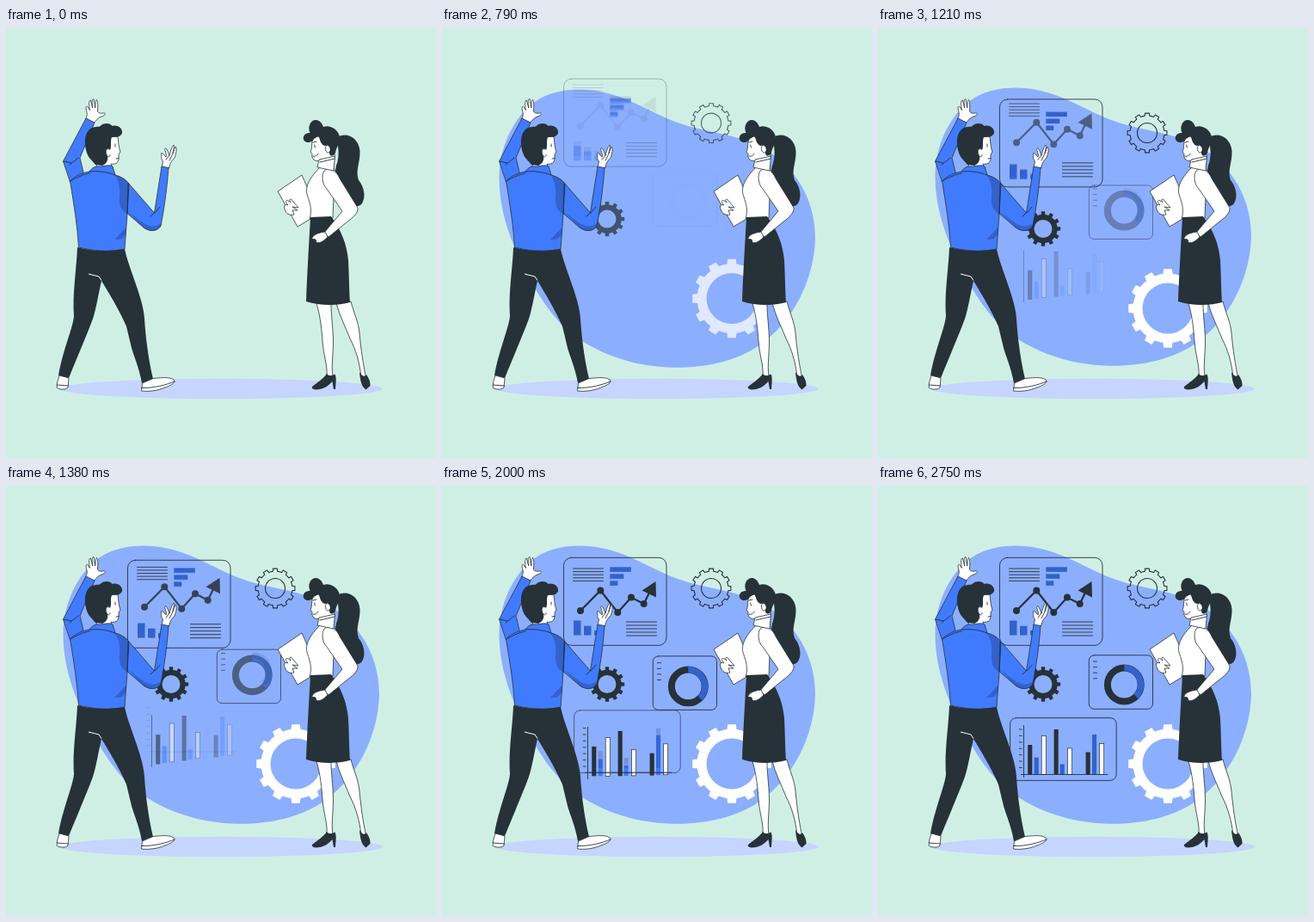
An HTML page that plays this animation: 500 by 500 pixels, repeating every 2.79 s.

```html
<!DOCTYPE html>
<html lang="en">
<head>
<meta charset="utf-8">
<title>Presentation</title>
<style>
html, body { margin: 0; width: 100%; height: 100%; overflow: hidden; background: #d0efe4; }
svg { display: block; width: 100vw; height: 100vh; }
.ln { fill: none; stroke: #263238; stroke-width: .9; stroke-linecap: round; stroke-linejoin: round; }
.w { fill: #fff; stroke: #263238; stroke-width: .8; stroke-linejoin: round; }
.b { fill: #407bff; stroke: #263238; stroke-width: .8; stroke-linejoin: round; }
.d { fill: #263238; }
.s { fill: #000; opacity: .2; }
</style>
</head>
<body>
<svg viewBox="0 0 500 500" xmlns="http://www.w3.org/2000/svg">
<ellipse cx="250" cy="419.5" rx="188" ry="11.7" fill="#c5d5ff"/>
<g id="scene"></g>

<g id="man">
  <path class="w" d="M92.500 106C94.500 102 94.500 100 93.800 97C92.300 93 93.300 89.500 95.300 92L97.500 95.500C96 89 96.500 83.500 98.500 84L100.700 93C99.700 86 100.200 82 102 82.500L103.700 93C104 88 104.300 83 105.700 83.500C107 86 107 91 106.500 96C107 99 109 99.800 114 98.800C117 99.500 115 102 111 103C108 104 106 106 102.500 110Z"/>
  <path class="b" d="M93 105L66.500 155L74.500 179L91 172L86 151L103 110Z"/>
  <path class="ln" d="M67 155L76 157M74 159L84 151"/>
  <path class="w" d="M118 126L130 126C131 133 130.500 138 133 144L131 147L131 151C131 157 127 159 122 158L124 165L105 165L106 150Z"/>
  <path class="d" d="M97 151C91 142 89.500 125 97 118C101 114.500 105 115 109 114.500C113 110 121 110 123.500 114C130 112 136 117 135 122.500C132 128 126 126.500 123 127C121 131 123 138 121 142C117 138 115 143 118 149C119 153 117 158 112 160L104 159Z"/>
  <path class="w" d="M120 141C116 139 115 145 118 149C120 151 121 149 121 147"/>
  <path class="ln" d="M127 135L127 138M128 152L131 151.500"/>
  <path class="w" d="M181 162L182.500 155C179.500 152 181.500 149 180.300 146C181.500 144 184 148 186 150C188 147 183 141 185.500 139.500C188 141 188.500 145 190 148C191 145 192 139 195 136C196.500 137 194 143 194 146L197 138C199.500 139 197.500 147 196 151C193 154 191 156 189.500 163Z"/>
  <path class="ln" d="M186 153L190 148M190 154L194 146"/>
  <path class="b" d="M142 180L172.500 215L181 161L189 162.500C187 190 183 215 180 230C177 236 168 238 160 232L138 213Z"/>
  <path class="s" d="M141 213L160 227C168 232 175 231 180.500 227L180 230C177 236 168 238 160 232Z"/>
  <path class="ln" d="M172.500 215L168 219M173 215L179 208"/>
  <path class="b" d="M74.500 178C80 172 90 168 97 167C100 162 105 160 110 161C116 160 121 159 124 161L127 171C135 173 140 177 143 181L141 216L138 257C120 261 100 259 84.500 255C83 230 79 205 74.500 178Z"/>
  <path class="s" d="M126 171C135 173 140 177 143 181L141 216C134 214 131 205 132 196C133 186 131 177 126 171ZM139.500 232L126 246C133 247 137 244 139 240Z"/>
  <path class="ln" d="M97 167C106 166 117 167 127 171M75 178C82 174 90 170 97 169M142 181L141 216"/>
  <path class="d" d="M83 255C100 260 120 260 138 257C142 278 160 315 161 338C162 355 165 383 171 408L158 413C155 395 148 380 146 372L140 347C133 330 119 307 111 294C107 312 104 330 101 338C94 357 84 380 73 407L61 404C66 375 78 348 79 335C77 310 82 280 83 255Z"/>
  <path d="M96 286L108 289L111 293.500" fill="none" stroke="#fff" stroke-width="1"/>
  <path class="w" d="M62 404L73 407L72 418C70 421 62 420.500 59.300 418.500C58.500 413 61 408 62 404Z"/>
  <path class="ln" d="M59.300 415L72.500 416"/>
  <path class="w" d="M158.500 413L171 407.500C178 407 190 405 195 409C198 412 193 415 185 418C176 422 165 423 157.500 422Z"/>
  <path class="ln" d="M157.500 418.500C172 419 186 415 196 411"/>
</g>

<g id="woman">
  <path class="d" d="M384 128C394 120 410 126 411.500 143C412 157 406 165 410 177C416 184 419 196 414 204C410 209 404 208 398 203C390 193 380 175 384 160C388 150 387 138 384 128Z"/>
  <path class="w" d="M384 320C388 335 394 346 400 361C407 375 411 388 413 406L419 408C415 390 413 375 411 355C410 342 404 330 401 318Z"/>
  <path class="w" d="M361 320C366 337 367 352 368 364C369 380 374 392 373 404L380 405C378 392 381 375 380.500 362C380 345 378 335 378 320Z"/>
  <path class="d" d="M356 417C361 413 369 408 373 402C376 406 379 404 382.500 402.500C384.500 406 383.500 413 383 420L381 420L379.500 411C375 416 369 420.500 360 420.500C357 420 355 419 356 417ZM411 400C414 405 417 406 419 403C422 407 424 412 423.500 416L418.500 420.500C413.500 417 412 411 411 400Z"/>
  <path class="w" d="M316 190L344 171L364 216L339 231Z"/>
  <path class="w" d="M366 161C357 170 346 183 350.500 195C354 205 356 212 353 222L380 221L381 195L388 175L381 163Z"/>
  <path class="d" d="M354 220L378 219C390 236 396 250 398 270C399 290 399 305 400 319C385 323 365 323 349 318C350 290 352 255 354 220Z"/>
  <path class="w" d="M370 166C377 161 385 167 388 175L409 209C410 216 401 222 396 226L375 243L370 238L391 213L373 187C367 181 367 171 370 166Z"/>
  <path class="w" d="M371 237C365 238 358 239 355.500 245L360 246L361 249.500C366 250.500 370 247 374 243Z"/>
  <path class="w" d="M325 213C322 207 324 204 328 206C323 201 326 198 331 203C328 198 332 198 334 202L340 209L333 208L339 212L333 212L335 217C331 218 327 217 325 213Z"/>
  <path class="w" d="M358 127C354 134 357 138 354 144L356 146.500C355 152 359 156 366 154L366 162L381 162L382 147L381 122Z"/>
  <path class="w" d="M364 153L382.500 149L381 166L362 162Z"/>
  <path class="ln" d="M365 156L382 152"/>
  <path class="d" d="M358 129C355 135 346 134 345.700 128C346 124 349 122 353.500 122C350 114 355 106 361 107C366 108 368 112 369 115C376 112 387 118 388 127C388 135 384 139 383 145C380 151 375 149 376 143C376 138 373 136 370 137C364 133 366 129 363 126Z"/>
  <path class="w" d="M376 138C373 134 370 138 372 143C374 147 377 144 377 142"/>
  <path class="ln" d="M358.500 136L359.500 139M357 133L361 132M357 149C360 150 362 148 363 146"/>
</g>
</svg>
<script>
const LOOP = 2790, DARK = '#263238', BLUE = '#407bff';
const scene = document.getElementById('scene');
const parts = [];

// Each part drops by `drop` px while fading in; longer drops fade in later.
function part(markup, start, span = 1450, drop = 30) {
  const g = document.createElementNS('http://www.w3.org/2000/svg', 'g');
  g.innerHTML = markup;
  scene.appendChild(g);
  parts.push({ g, start, span, drop });
}

const rect = (x, y, w, h, extra) => `<rect x="${x}" y="${y}" width="${w}" height="${h}" ${extra}/>`;
const card = (x, y, w, h, r) => rect(x, y, w, h, `rx="${r}" class="ln"`);
const line = (x1, y1, x2, y2) => `<path class="ln" d="M${x1} ${y1}L${x2} ${y2}"/>`;
const rows = (n, x1, x2, y, step) =>
  Array.from({ length: n }, (_, i) => line(x1, y + i * step, x2, y + i * step)).join('');

function ring(cx, cy, r) {
  return `M${cx - r} ${cy}a${r} ${r} 0 1 0 ${2 * r} 0a${r} ${r} 0 1 0 ${-2 * r} 0Z`;
}

function gear(cx, cy, outer, root, hole, style) {
  const pts = [], teeth = 12, step = 2 * Math.PI / teeth;
  for (let i = 0; i < teeth; i++) {
    for (const [k, r] of [[-.26, root], [-.2, outer], [.2, outer], [.26, root], [.5, root]]) {
      const a = (i + k) * step - Math.PI / 2;
      pts.push((cx + r * Math.cos(a)).toFixed(2) + ' ' + (cy + r * Math.sin(a)).toFixed(2));
    }
  }
  return `<path fill-rule="evenodd" ${style} d="M${pts.join('L')}Z${ring(cx, cy, hole)}"/>`;
}

// Backdrop and gears
part('<path fill="#8caeff" d="M158 69.500C205 69 235 93 270 106.500C300 118 332 120 360 131C403 149 434 190 434 242C433 290 409 339 369 367C343 385 308 392.800 272 392.800C224 392.800 178 376 148 351C128 334 110 306 98 282C83 252 66.500 216 66.500 172C66.500 130 90 90 120 77C132 72 145 69.600 158 69.500Z"/>', 0, 950);
part(gear(313, 119, 23, 20, 11.5, `fill="none" stroke="${DARK}" stroke-width="1.1"`), 105, 1250, 50);
part(gear(192, 230.5, 20.3, 16.7, 10.5, `fill="${DARK}"`), 105, 1250, 50);
part(gear(337, 323, 46, 40.5, 29.5, 'fill="#fff"'), 105, 1250, 50);

// Trend card
part(card(141.5, 83.3, 119.5, 102, 9), 205, 1500, 50);
const hbars = style => rect(195.3, 94.3, 24.5, 5.5, style) + rect(195.3, 102.3, 16, 5.5, style) + rect(195.3, 110.3, 9, 5.5, style);
part(hbars(`fill="${BLUE}"`), 160, 1250, 50);
part(hbars('class="s"'), 190, 1250, 50);
const columns = style => rect(153, 156.5, 8.5, 17, style) + rect(165, 162.7, 8.5, 10.8, style) + rect(177, 168, 8.5, 5.5, style);
part(columns(`fill="${BLUE}"`), 225, 1300, 50);
part(columns('class="s"'), 290, 1300, 50);
part(rows(5, 152.5, 187.5, 96, 3.6), 380, 1567, 40);
part(rows(5, 214.5, 249.5, 158, 4), 190, 1555, 50);
const nodes = [[161, 145], [184.3, 121.5], [204.3, 147], [220, 129.5], [234.7, 137]];
part(`<path fill="none" stroke="${DARK}" stroke-width="2.2" d="M${nodes.join('L')}L243 120"/>` +
  nodes.map(([x, y]) => `<circle cx="${x}" cy="${y}" r="4" fill="${DARK}"/>`).join('') +
  `<path fill="${DARK}" d="M248.500 111L232.500 121.500L249 129.500Z"/>`, 545, 1450, 35);

// Donut card
part(card(245.3, 196.8, 74.2, 62.5, 6), 630);
part(rows(4, 250.5, 254.5, 204, 6.6), 700);
part(`<circle cx="286.300" cy="231" r="19.400" fill="none" stroke="${DARK}" stroke-width="8"/>`, 740);
const arc = (color, opacity) =>
  `<path fill="none" stroke="${color}" stroke-opacity="${opacity}" stroke-width="7" d="M286.300 211.600A19.400 19.400 0 0 1 300 244.700"/>`;
part(arc(BLUE, 1), 760);
part(arc('#000', .2), 830);

// Bar card
part(line(169.5, 278.5, 169.5, 338.5), 755);
const bars = [[174.2, 301], [181.7, 315.7], [190.2, 290.5], [204.6, 283], [211.6, 323.5],
  [220.5, 305], [241.6, 309.5], [249, 289], [257.6, 299.5]];
const fills = [`fill="${DARK}"`, `fill="${BLUE}"`, `fill="#fff" stroke="${DARK}" stroke-width=".7"`];
bars.forEach(([x, y], i) => part(rect(x, y, 5.1, 335.4 - y, fills[i % 3]), 755 + i * 30));
part(bars.filter((_, i) => i % 3 === 1).map(([x, y]) => rect(x, y, 5.1, 335.4 - y, 'class="s"')).join(''), 1270);
part(rows(7, 164.3, 167.2, 283, 7.4), 1080);
part(line(166.5, 335.5, 267, 335.5), 1120);
part(card(153.6, 269.6, 123.6, 72.8, 7), 1316, 1424);

const bez = (u, a, b) => 3 * (1 - u) * (1 - u) * u * a + 3 * (1 - u) * u * u * b + u * u * u;

function ease(x) {
  if (x <= 0) return 0;
  if (x >= 1) return 1;
  let lo = 0, hi = 1;
  for (let i = 0; i < 20; i++) {
    const mid = (lo + hi) / 2;
    if (bez(mid, .36, .5) < x) lo = mid; else hi = mid;
  }
  return bez(lo, -.01, 1.38);
}

function draw(t) {
  for (const { g, start, span, drop } of parts) {
    const p = ease((t - start) / span);
    const shown = Math.max(0, Math.min(1, p)) ** (drop / 30);
    g.setAttribute('opacity', shown.toFixed(3));
    g.setAttribute('transform', `translate(0 ${(drop * (p - 1)).toFixed(2)})`);
  }
}

const began = performance.now();
function tick() {
  draw((performance.now() - began) % LOOP);
  requestAnimationFrame(tick);
}
draw(0);
requestAnimationFrame(tick);
</script>
</body>
</html>
```
